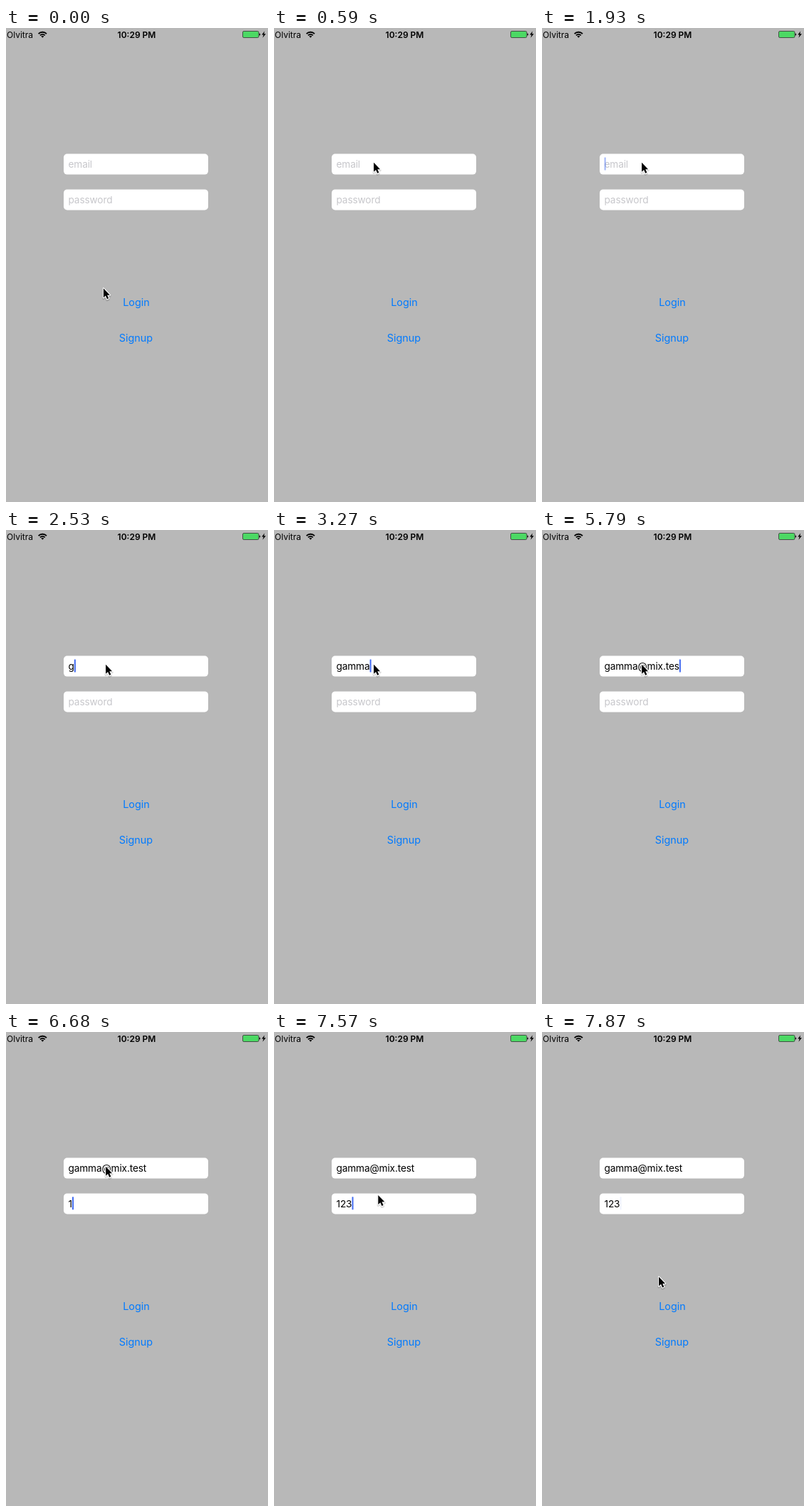
An HTML page for the animation above (8000 ms loop, 368x665 px).

```html
<!DOCTYPE html>
<html lang="en">
<head>
<meta charset="utf-8">
<title>Login form</title>
<style>
  html, body { margin: 0; width: 100%; height: 100%; overflow: hidden; background: #b8b8b8; }
  svg { display: block; }
  text { font-family: Inter, Roboto, sans-serif; white-space: pre; }
  .status { font-size: 12px; }
  .field { font-size: 13.7px; letter-spacing: -0.15px; }
  .hint { fill: #c7c7cb; }
  .button { font-size: 14.4px; fill: #007aff; text-anchor: middle; }
</style>
</head>
<body>
<svg width="368" height="665" viewBox="0 0 368 665">
  <rect width="368" height="665" fill="#b8b8b8"/>

  <text class="status" x="1" y="13.6">Olvitra</text>
  <g fill="none" stroke="#000" stroke-width="1.9">
    <path d="M45.6 8.1a8.2 8.2 0 0 1 11.4 0"/>
    <path d="M47.9 10.4a5 5 0 0 1 6.8 0"/>
  </g>
  <path d="M51.3 13.7l-2-2.1a2.9 2.9 0 0 1 4 0z"/>
  <text class="status" x="183.5" y="13.6" font-weight="600" text-anchor="middle">10:29 PM</text>
  <rect x="332.5" y="4.5" width="22.5" height="9" rx="1.6" fill="#4cd964" stroke="#333" stroke-width=".8"/>
  <path d="M355.7 7.2q1.5.4 1.5 1.8t-1.5 1.8z"/>
  <path d="M363.2 4.4l-4 5.1h2.5l-1.3 4.2 4.5-5.5h-2.6z"/>

  <rect x="81" y="176.6" width="203" height="29" rx="5" fill="#fff"/>
  <rect x="81" y="226.4" width="203" height="29" rx="5" fill="#fff"/>
  <text class="field" id="email" x="87.5" y="195.9"></text>
  <text class="field" id="password" x="87.5" y="245.7"></text>
  <rect id="caret" width="2" height="18" rx=".5" fill="#426bf2"/>

  <text class="button" x="183" y="390.4">Login</text>
  <text class="button" x="182.4" y="439.5">Signup</text>

  <g id="cursor">
    <path d="M0 1.4V14.4L3 11.6 5.1 16.4 7.3 15.4 5.2 10.8H9Z" fill="none" stroke="#000" stroke-opacity=".14" stroke-width="3.4" stroke-linejoin="round"/>
    <path d="M0 0V13L3 10.2 5.1 15 7.3 14 5.2 9.4H9Z" stroke="#fff" stroke-width="2.2" stroke-linejoin="round" paint-order="stroke"/>
  </g>
</svg>
<script>
const LOOP = 8000, TICK = 148.4;
const $ = id => document.getElementById(id);
const caret = $('caret'), cursor = $('cursor');

const fields = [
  { el: $('email'), hint: 'email', value: 'gamma@mix.test', caretY: 181.5 },
  { el: $('password'), hint: 'password', value: '123', caretY: 231.3 }
];

// [time, focused field, characters typed]; each entry restarts the caret blink
const keys = [
  [1340, 0, 0], [2530, 0, 1], [2670, 0, 2], [2820, 0, 3], [2970, 0, 4],
  [3270, 0, 5], [4010, 0, 6], [4160, 0, 6], [4760, 0, 7], [4910, 0, 8],
  [5060, 0, 9], [5210, 0, 10], [5500, 0, 11], [5650, 0, 12], [5790, 0, 13],
  [5940, 0, 14], [6090, 1, 0], [6680, 1, 1], [6980, 1, 2], [7120, 1, 3]
];

const smooth = p => {
  p = Math.min(1, Math.max(0, p));
  return p * p * (3 - 2 * p);
};
const mix = (a, b, p) => a + (b - a) * p;

function caretAlpha(idle) {
  const phase = idle % 1180;
  if (phase < 585) return 1;
  if (phase < 725) return 0.5;
  return phase < 1030 ? 0.08 : 0.5;
}

function cursorAt(t) {
  const n = Math.floor((t + 6) / TICK);
  const up = smooth(n / 4), down = smooth((n - 50) / 3);
  return [
    mix(mix(136.9, 140.1, up), 164.1, down),
    mix(mix(365.3, 188.8, up), 343.6, down)
  ];
}

function setField(field, count) {
  const text = count ? field.value.slice(0, count) : field.hint;
  if (field.el.textContent !== text) field.el.textContent = text;
  field.el.classList.toggle('hint', !count);
}

function draw(t) {
  const counts = [0, 0];
  let last = null;
  for (const key of keys) {
    if (key[0] > t) break;
    counts[key[1]] = key[2];
    last = key;
  }
  fields.forEach((field, i) => setField(field, counts[i]));

  if (last) {
    const [time, i, count] = last, { el, caretY } = fields[i];
    const width = count ? el.getComputedTextLength() : 0;
    caret.setAttribute('x', 87.6 + width);
    caret.setAttribute('y', caretY);
    caret.setAttribute('opacity', caretAlpha(t - time));
  } else {
    caret.setAttribute('opacity', 0);
  }

  cursor.setAttribute('transform', `translate(${cursorAt(t)})`);
}

const start = performance.now();
function loop() {
  draw((performance.now() - start) % LOOP);
  requestAnimationFrame(loop);
}
loop();
</script>
</body>
</html>
```
